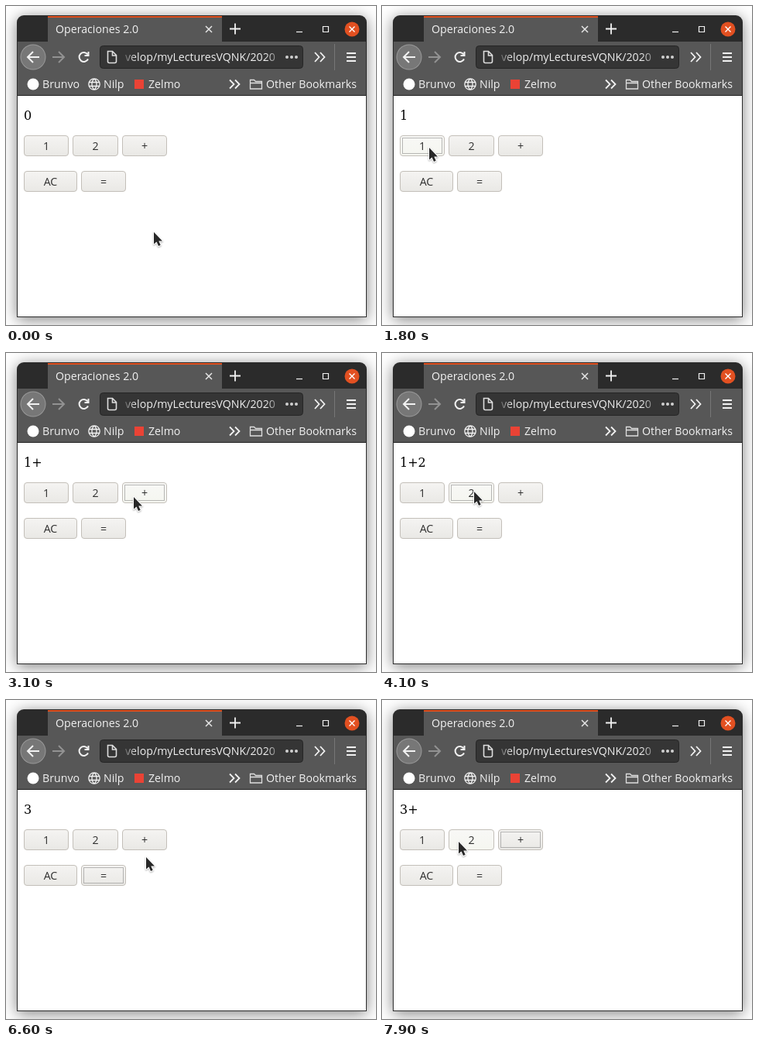
These frames come from a looping animation (478 by 412 pixels, 8 s). An HTML page with a canvas:

```html
<!DOCTYPE html>
<html lang="es">
<head>
<meta charset="utf-8">
<style>
html, body { margin: 0; width: 100%; height: 100%; overflow: hidden; background: #fff; }
canvas { display: block; }
</style>
</head>
<body>
<canvas id="stage" width="478" height="412"></canvas>
<script>
const ctx = document.getElementById('stage').getContext('2d');
const LOOP = 8000, STEP = 100;
const UI_FONT = '14.2px "Open Sans", "Noto Sans", sans-serif';
const LIGHT = '#f2f2f2', CHROME = '#575757';

// label: [x, y, width]
const buttons = { '1': [23, 167, 58], '2': [86, 167, 59], '+': [150, 167, 58], 'AC': [23, 213, 69], '=': [97, 213, 58] };

// start time, number of steps, destination
const moves = [
  [600, 7, 64, 196], [1400, 1, 61, 183], [1900, 6, 167, 189], [2700, 2, 165, 186],
  [3600, 3, 119, 179], [4700, 3, 122, 221], [6600, 1, 181, 203], [6800, 3, 187, 178],
  [7400, 1, 184, 176], [7500, 2, 146, 179], [7800, 2, 99, 183]
];
const readout = [[0, '0'], [1800, '1'], [3100, '1+'], [4100, '1+2'], [5400, '3'], [7100, '3+']];
const focus = [[0, ''], [1800, '1'], [2900, '+'], [4100, '2'], [5400, '='], [7000, '+']];
const press = [[0, ''], [2900, '+'], [3100, ''], [7000, '+'], [7100, '']];
const hover = [
  [0, ''], [1000, 'AC'], [1100, ''], [1400, '1'], [2000, '2'], [2300, ''], [2700, '+'],
  [3700, '2'], [4800, ''], [5400, '='], [6600, ''], [6800, '+'], [7600, '2']
];

const valueAt = (track, t) => track.filter(key => key[0] <= t).pop()[1];

function cursorAt(t) {
  let x = 191, y = 292;
  for (const [start, steps, toX, toY] of moves) {
    if (t < start) break;
    const k = Math.min(1, (Math.floor((t - start) / STEP) + 1) / steps);
    const ease = k * k * (3 - 2 * k);
    x += (toX - x) * ease;
    y += (toY - y) * ease;
  }
  return [Math.round(x), Math.round(y)];
}

function rect(x, y, w, h, color) {
  ctx.fillStyle = color;
  ctx.fillRect(x, y, w, h);
}

function rounded(x, y, w, h, r, fill, stroke) {
  ctx.beginPath();
  ctx.roundRect(x, y, w, h, r);
  ctx.fillStyle = fill;
  ctx.fill();
  if (stroke) {
    ctx.strokeStyle = stroke;
    ctx.lineWidth = 1;
    ctx.stroke();
  }
}

function disc(x, y, r, fill) {
  ctx.beginPath();
  ctx.arc(x, y, r, 0, Math.PI * 2);
  ctx.fillStyle = fill;
  ctx.fill();
}

function stroke(d, color = LIGHT, width = 1.8) {
  ctx.strokeStyle = color;
  ctx.lineWidth = width;
  ctx.stroke(new Path2D(d));
}

function text(value, x, y, color = LIGHT, font = UI_FONT, align = 'left') {
  ctx.font = font;
  ctx.textAlign = align;
  ctx.fillStyle = color;
  ctx.fillText(value, x, y);
}

function drawFrame() {
  rect(0, 0, 478, 412, '#fff');
  ctx.save();
  ctx.shadowColor = 'rgba(0,0,0,.5)';
  ctx.shadowBlur = 19;
  ctx.shadowOffsetY = 3;
  rounded(14, 12, 452, 390, [9, 9, 0, 0], '#2b2b2b');
  ctx.restore();
  rect(15, 46, 450, 69, CHROME);
  rect(15, 115, 450, 1, '#202020');
  rect(15, 116, 450, 285, '#fff');
}

function drawTitleBar() {
  rect(54, 13, 225, 33, CHROME);
  rect(54, 13, 225, 2, '#e0501f');
  text('Operaciones 2.0', 64, 35);
  stroke('M258 26l8 8m0-8l-8 8', '#e6e6e6', 1.5);
  stroke('M289 29.5h14M296 22.5v14');
  stroke('M375 33.5h8', LIGHT, 1.2);
  stroke('M409.5 26.5h7v7h-7z', LIGHT, 1.2);
  disc(447, 30, 9.5, '#e25021');
  stroke('M443.5 26.5l7 7m0-7l-7 7', '#fff', 1.4);
}

function drawToolbar() {
  disc(35, 66, 16.5, '#999');
  disc(35, 66, 15.5, '#777');
  stroke('M43 66H28m7-7l-7 7l7 7', LIGHT, 2);
  stroke('M60 66h15m-7-7l7 7l-7 7', '#929292', 2);
  stroke('M105.5 62.5A6 6 0 1 0 106 68.5M106.5 59v5h-5', LIGHT, 2);

  rounded(121.5, 51.5, 262, 29, 4, '#353535', '#252525');
  stroke('M131.5 58.5h6l5 5v8q0 2-2 2h-7q-2 0-2-2zM137.5 59v5h5', '#dedede', 1.6);
  ctx.save();
  ctx.beginPath();
  ctx.rect(154, 52, 200, 28);
  ctx.clip();
  const fade = ctx.createLinearGradient(152, 0, 356, 0);
  fade.addColorStop(0, '#555');
  fade.addColorStop(.08, '#eee');
  fade.addColorStop(.9, '#eee');
  fade.addColorStop(1, '#454545');
  text('velop/myLecturesVQNK/2020', 154, 71, fade);
  ctx.restore();
  for (const x of [363, 369, 375]) disc(x, 66, 2, '#d0d0d0');

  stroke('M399 60l5.5 6l-5.5 6m7-12l5.5 6l-5.5 6');
  rect(424, 49, 1, 34, '#777');
  stroke('M440 61h12m-12 5h12m-12 5h12');
}

function drawBookmarks() {
  disc(35, 101, 7.5, '#fff');
  text('Brunvo', 47, 106);
  stroke('M106.8 101a7.2 7.2 0 1 0 14.4 0a7.2 7.2 0 1 0-14.4 0M114 94c-4 3-4 11 0 14c4-3 4-11 0-14M107.5 98.5h13m-13 5h13', LIGHT, 1.3);
  text('Nilp', 126, 106);
  rect(166, 95, 12, 12, '#ea4335');
  text('Zelmo', 184, 106);
  stroke('M289 95.5l5.5 5.5l-5.5 5.5m7-11l5.5 5.5l-5.5 5.5');
  stroke('M315.5 97v-1.5h5l2 2h8v9.5h-15zM315.5 99.5h15', '#dedede', 1.3);
  text('Other Bookmarks', 336, 106);
}

function drawButton(label, t) {
  const [x, y, w] = buttons[label];
  const pressed = valueAt(press, t) === label;
  const hovered = valueAt(hover, t) === label;
  const [top, bottom] = pressed ? ['#e2e1dd', '#dddcd8'] : hovered ? ['#f8f8f6', '#f5f6f0'] : ['#f5f4f2', '#e9e8e5'];
  const fill = ctx.createLinearGradient(0, y, 0, y + 27);
  fill.addColorStop(0, top);
  fill.addColorStop(1, bottom);
  rounded(x + .5, y + .5, w - 1, 26, 3.5, fill, '#c3bfb9');
  if (valueAt(focus, t) === label) {
    ctx.save();
    ctx.setLineDash([1, 1]);
    ctx.lineWidth = 1;
    ctx.strokeStyle = '#777';
    ctx.strokeRect(x + 3.5, y + 3.5, w - 7, 20);
    ctx.restore();
  }
  text(label, x + w / 2, y + 19, '#303030', UI_FONT, 'center');
}

const arrow = new Path2D('M0 0V15.5L3.6 12.4L6 18L8.7 16.8L6.3 11.4H11Z');

function drawCursor(t) {
  ctx.save();
  ctx.translate(...cursorAt(t));
  ctx.lineJoin = 'round';
  ctx.strokeStyle = '#fff';
  ctx.lineWidth = 2.2;
  ctx.shadowColor = 'rgba(0,0,0,.3)';
  ctx.shadowBlur = 2;
  ctx.shadowOffsetY = 1;
  ctx.stroke(arrow);
  ctx.shadowColor = 'transparent';
  ctx.fillStyle = '#282828';
  ctx.fill(arrow);
  ctx.restore();
}

function draw(t) {
  drawFrame();
  drawTitleBar();
  drawToolbar();
  drawBookmarks();
  text(valueAt(readout, t), 23, 147, '#000', '16px "DejaVu Serif", serif');
  for (const label of Object.keys(buttons)) drawButton(label, t);
  drawCursor(t);
}

let origin;
function tick(now) {
  origin ??= now;
  draw((now - origin) % LOOP);
  requestAnimationFrame(tick);
}
draw(0);
requestAnimationFrame(tick);
</script>
</body>
</html>
```
